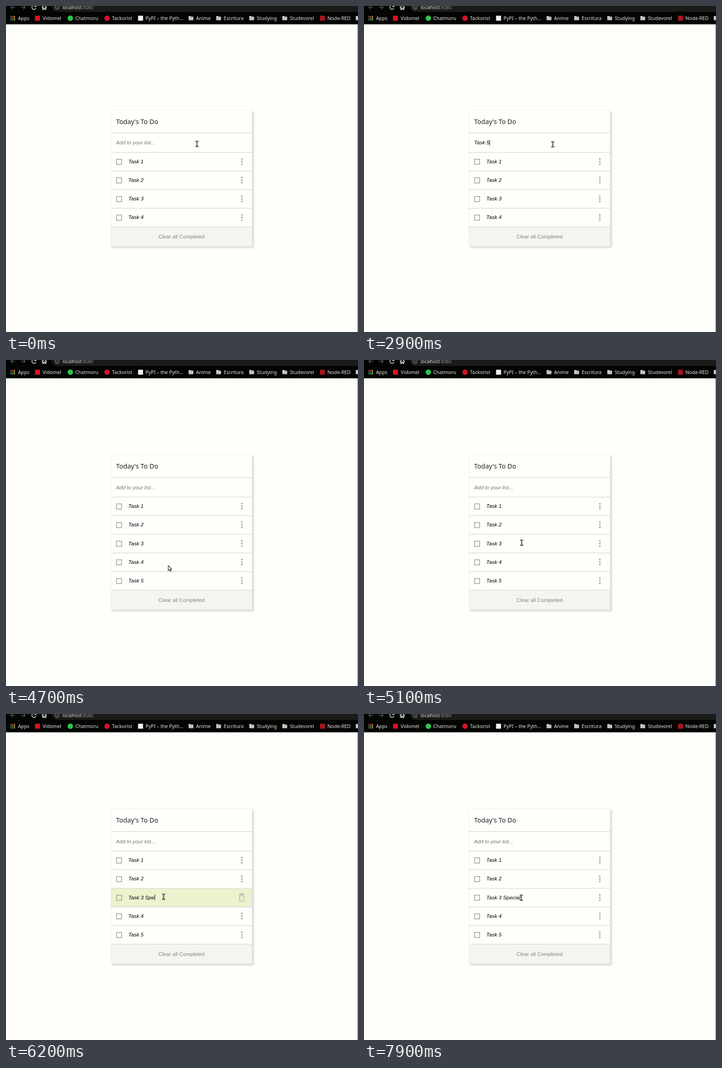
These frames come from a looping animation (777 px wide and 721 px high, 8 s). An HTML page:

```html
<!DOCTYPE html>
<html lang="en">
<head>
<meta charset="utf-8">
<title>To do list</title>
<style>
html, body { margin: 0; width: 100%; height: 100%; overflow: hidden; background: #fefffb; }
#paper { position: absolute; left: 232px; width: 311px; background: #fefffb;
  box-shadow: 0 0 2px #d9dbd7, 3px 3px 4px 1px #d9dbd7; }
svg { position: absolute; left: 0; top: 0; display: block; }
text { white-space: pre; }
.bar { font: 10.7px "Noto Sans", sans-serif; fill: #e8e9e5; }
.url { font-size: 10px; }
.title { font: 14.5px "Open Sans", sans-serif; fill: #111; }
.item { font: italic 11.6px "Liberation Sans", Arial, sans-serif; fill: #000; }
.hint { fill: #757575; }
.clear { font: 11.6px "Liberation Sans", Arial, sans-serif; fill: #828280; text-anchor: middle; }
.box { fill: none; stroke: #9b9b99; stroke-width: 1.5; }
.line { fill: #dcddd9; }
.icon { fill: none; stroke: #e8e9e5; stroke-width: 1.5; }
.dim { stroke: #565754; }
.grey { fill: #b5b6b2; }
.bin { fill: none; stroke: #b5b6ae; stroke-width: 1.6; }
</style>
</head>
<body>
<div id="paper"></div>
<svg id="stage" width="777" height="721" viewBox="0 0 777 721">
  <g id="browser">
    <rect width="777" height="40.5" fill="#030502"/>
    <path d="M101 0H777V13H112Q103 12 101 0Z" fill="#1b1c1a"/>
    <rect x="776" y="40" width="1" height="681" fill="#5b5c5a"/>
    <path class="icon dim" d="M20 3H11M15 -1.5L10.7 3L15 7.5M33 3H42M38 -1.5L42.3 3L38 7.5"/>
    <path class="icon" d="M65 0A4.5 4.5 0 1 0 66 4.5M66.3 -2V1.2H62.5"/>
    <path class="icon" d="M79 3.5L84.5 -1.5L90 3.5M81 2.5V7.7H83.2V4.5H85.8V7.7H88V2.5"/>
    <circle class="icon" cx="113" cy="3" r="4.3" style="stroke:#a5a6a2;stroke-width:1.1"/>
    <path class="icon" d="M113 2.3V5.5M113 .4V1.4" style="stroke:#a5a6a2;stroke-width:1.1"/>
    <text class="bar url" x="125" y="7">localhost<tspan fill="#969793">:8080</tspan></text>
  </g>
  <g id="list"></g>
  <rect id="caret" width="1" height="12.5" fill="#000"/>
  <g id="beam">
    <path d="M-3.2 -5.5H-1.2L0 -4.6L1.2 -5.5H3.2M0 -4.6V4.6M-3.2 5.5H-1.2L0 4.6L1.2 5.5H3.2" fill="none" stroke="#161616" stroke-width="2.4"/>
    <path d="M-2.5 -5.5H-1L0 -4.6L1 -5.5H2.5M0 -4.6V4.6M-2.5 5.5H-1L0 4.6L1 5.5H2.5" fill="none" stroke="#e4e5e1" stroke-width=".8"/>
  </g>
  <path id="arrow" d="M.5 .5V11.8L3.1 9.4L4.9 13.6L6.9 12.7L5.1 8.7H8.4Z" fill="#fff" stroke="#161616" stroke-width="1.1"/>
</svg>
<script>
const $ = id => document.getElementById(id);
const list = $('list'), caret = $('caret'), paper = $('paper');
const LOOP = 8000, ROW = 41.2, HINT = 'Add to your list...';

function add(parent, tag, attrs, label) {
  const el = document.createElementNS('http://www.w3.org/2000/svg', tag);
  for (const key in attrs) el.setAttribute(key, attrs[key]);
  if (label !== undefined) el.textContent = label;
  parent.appendChild(el);
  return el;
}

// Bookmarks bar
const bar = $('browser');
const mark = (x, label) => add(bar, 'text', { class: 'bar', x, y: 31 }, label);
const disc = (cx, fill) => add(bar, 'circle', { cx, cy: 27, r: 6, fill });
const square = (x, fill) => add(bar, 'rect', { x, y: 21.5, width: 11, height: 11, fill });
const folder = x => add(bar, 'path', {
  d: `M${x} 23q0-1 1-1h3.2l1.3 1.4h4.2q1 0 1 1v6.1q0 1-1 1h-8.7q-1 0-1-1z`, fill: '#c3c4c0' });

const dots = ['#e8453c', '#e8453c', '#f0a030', '#35a853', '#4286f5', '#f5bc20', '#35a853', '#35a853', '#f5bc20'];
dots.forEach((fill, i) => add(bar, 'rect', {
  x: 10 + i % 3 * 3.7, y: 22 + Math.floor(i / 3) * 3.7, width: 2.5, height: 2.5, fill }));
mark(26.5, 'Apps');
square(64, '#e0101c');
mark(81, 'Vidomel');
disc(142, '#2cc64f');
mark(153, 'Chatmoru');
disc(223, '#d5112b');
mark(234, 'Tackorist');
square(291.5, '#f1f2ee');
mark(308, 'PyPI – the Pyth…');
[[403, 'Anime'], [464, 'Escritura'], [537, 'Studying'], [610, 'Studevorel'], [772, '']].forEach(([x, label]) => {
  folder(x);
  mark(x + 16.5, label);
});
square(693, '#a8161c');
mark(709.5, 'Node-RED');

// The list card, centred on the page for any number of tasks
function buildCard(count) {
  const g = add(list, 'g', {});
  const height = 135.5 + ROW * count, top = 381.1 - height / 2, first = top + 92.8;
  const line = y => add(g, 'rect', { class: 'line', x: 232, y: y - .75, width: 311, height: 1.5 });
  const rows = [];
  add(g, 'text', { class: 'title', x: 243, y: Math.round(top + 30) }, "Today's To Do");
  const input = add(g, 'text', { class: 'item hint', x: 243, y: Math.round(top + 75.2) }, HINT);
  for (let i = 0; i < count; i++) {
    const y = first + ROW * i, mid = y + ROW / 2;
    const fill = add(g, 'rect', { x: 232, y, width: 311, height: ROW, fill: '#edf1cd' });
    add(g, 'rect', { class: 'box', x: 243.9, y: mid - 5.5, width: 11.4, height: 11.4 });
    const label = add(g, 'text', { class: 'item', x: 270, y: Math.floor(mid + 4) }, 'Task ' + (i + 1));
    const menu = add(g, 'g', { class: 'grey' });
    for (const d of [-6, -.3, 5.4]) add(menu, 'circle', { cx: 520.6, cy: mid + d, r: 2.1 });
    const bin = add(g, 'path', { class: 'bin',
      d: `M514 ${mid - 7}h13m-9 -.4v-1.3h5v1.3M515.8 ${mid - 4.2}h9.4v11.1q0 1-1 1h-7.4q-1 0-1-1z` });
    rows.push({ fill, label, menu, bin });
  }
  const foot = first + ROW * count;
  add(g, 'rect', { x: 232, y: foot, width: 311, height: top + height - foot, fill: '#f4f5f1' });
  add(g, 'text', { class: 'clear', x: 387.5, y: Math.round(foot + 25.4) }, 'Clear all Completed');
  line(top + 49.6);
  for (let i = 0; i <= count; i++) line(first + ROW * i);
  return { g, input, rows, top, height, inputCaret: top + 65, rowCaret: first + ROW * 2.5 - 6.7 };
}
const cards = [buildCard(4), buildCard(5)];

const pen = document.createElement('canvas').getContext('2d');
function textWidth(s) {
  pen.font = 'italic 11.6px "Liberation Sans", Arial, sans-serif';
  return pen.measureText(s).width;
}

// [start time, value] steps
const typed = [[0, ''], [1300, 'T'], [1600, 'Ta'], [1800, 'Tas'], [1900, 'Task'], [2100, 'Task '], [2900, 'Task 5'], [3300, '']];
const edited = [[0, ''], [5500, ' '], [5800, ' S'], [6000, ' Sp'], [6200, ' Spe'],
  [6400, ' Spec'], [6500, ' Speci'], [6600, ' Specia'], [6700, ' Special']];
const blink = [[0, 0], [400, 1], [2700, 0], [2900, 1], [3700, 0], [4100, 1], [4500, 0], [5200, 1], [7300, 0]];
const pointer = [[0, ['beam', 421.5, 305]], [100, ['beam', 416.7, 306]], [3300, ['arrow', 414.6, 303.6]],
  [4500, ['arrow', 401, 342]], [4600, ['arrow', 373, 418]], [4700, ['arrow', 357.6, 454]],
  [4800, ['arrow', 354, 442]], [4900, ['arrow', 350, 422]], [5000, ['beam', 348.5, 408]],
  [5100, ['beam', 348, 404.3]], [7800, ['beam', 347.7, 405.2]], [7900, ['beam', 347.2, 406.2]]];
const at = (steps, t) => steps.filter(step => step[0] <= t).pop()[1];
const show = (el, on) => { el.style.display = on ? '' : 'none'; };

function render(t) {
  const card = cards[t < 3300 ? 0 : 1];
  cards.forEach(c => show(c.g, c === card));
  paper.style.top = card.top + 'px';
  paper.style.height = card.height + 'px';

  const entry = at(typed, t), task = 'Task 3' + at(edited, t);
  card.input.textContent = entry || HINT;
  card.input.classList.toggle('hint', !entry);
  card.rows.forEach((row, i) => {
    const active = i === 2 && t >= 5200 && t < 7500, deletable = active && t >= 5400;
    show(row.fill, active);
    show(row.menu, !deletable);
    show(row.bin, deletable);
  });
  card.rows[2].label.textContent = task;

  const editing = t >= 5200;
  show(caret, at(blink, t));
  caret.setAttribute('x', Math.round(editing ? 270 + textWidth(task) : 243 + textWidth(entry)));
  caret.setAttribute('y', Math.round(editing ? card.rowCaret : card.inputCaret));

  const [shape, x, y] = at(pointer, t);
  show($('beam'), shape === 'beam');
  show($('arrow'), shape === 'arrow');
  $(shape).setAttribute('transform', `translate(${x} ${y})`);
}

function tick() {
  render(performance.now() % LOOP);
  requestAnimationFrame(tick);
}
tick();
</script>
</body>
</html>
```
